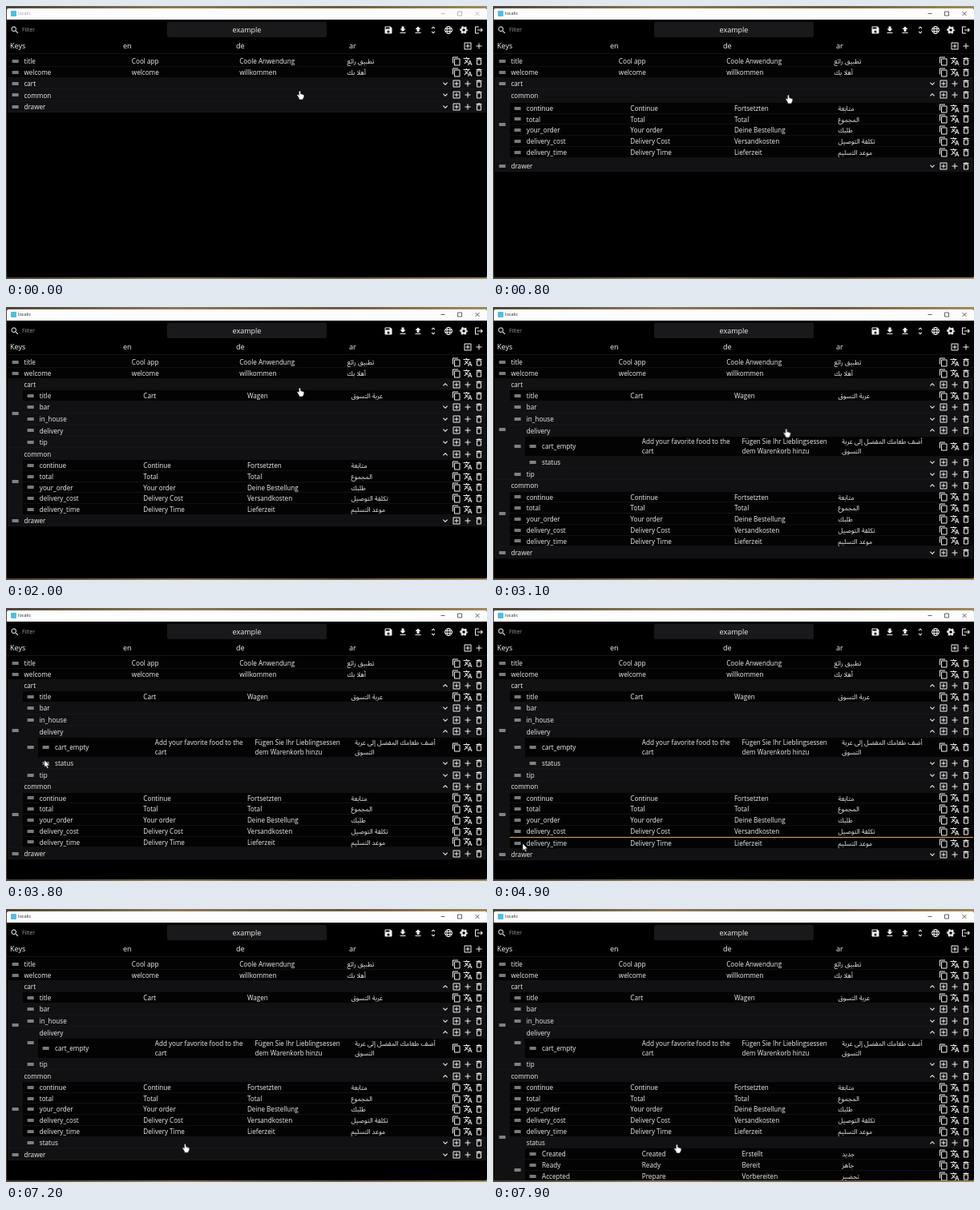
Recreate the animation shown at these times as an HTML page. Size 600x341 px, loop 8000 ms.

```html
<!DOCTYPE html>
<html lang="en">
<head>
<meta charset="utf-8">
<title>localic</title>
<style>
* { box-sizing: border-box; }
html, body { margin: 0; width: 100%; height: 100%; overflow: hidden; }
body {
  position: relative; color: #f2f2f2;
  background: linear-gradient(90deg, #4c4436, #8a7a58 35%, #6b5c3e 70%, #a08a5c);
  font: 8.15px/13.75px "Open Sans", "Noto Sans", "Noto Sans Arabic", "DejaVu Sans", sans-serif;
  white-space: pre;
}
svg { display: block; width: 12px; height: 12px; fill: currentColor; flex: none; }
#win { position: absolute; left: 1px; top: 3px; width: 598.5px; height: 336px; overflow: hidden; border-radius: 2px; background: #000; }
#bar { position: absolute; inset: 0 0 auto; height: 14px; background: #fdfdfd; font-size: 5.6px; line-height: 13px; color: #222; animation: focus 8s infinite; }
#bar i { position: absolute; left: 4.5px; top: 3px; width: 7px; height: 6.5px; background: #4fbfe0; border-radius: 1px; }
#bar span { position: absolute; left: 14px; }
#bar svg { position: absolute; left: 540px; top: 3px; width: 52px; height: 7px; fill: none; stroke: currentColor; stroke-width: .7; }
#tools svg, #find { position: absolute; top: 21px; }
#find { left: 4px; }
#filter { position: absolute; left: 19px; top: 20px; font-size: 6.9px; color: #999; }
#name { position: absolute; left: 200px; top: 17px; width: 199px; height: 19px; background: #19191b; border-radius: 2px; text-align: center; font-size: 9px; line-height: 20px; }
#head { position: absolute; left: 4px; top: 39px; width: 564px; display: flex; font-size: 9.1px; line-height: 16px; }
#head span { flex: 1; }
#win > .acts { top: 41px; }
#rule { position: absolute; left: 0; right: 0; top: 56px; height: 1px; background: #151516; }
#list { position: absolute; left: .8px; right: .5px; top: 59px; }
.acts { position: absolute; right: 2px; top: 0; height: 100%; display: flex; align-items: center; }
#win > .acts { right: 2.5px; height: 12px; }
.acts svg { margin: 0 1px; }
.item { display: flex; position: relative; overflow: hidden; }
.grip { width: 19.3px; flex: none; display: flex; align-items: center; justify-content: center; }
.body { flex: 1; min-width: 0; }
.row { position: relative; display: flex; align-items: center; height: 14.65px; padding: 0 39px 0 1.4px; }
.row span { flex: 1 1 0; min-width: 0; }
.leaf { background: #030303; box-shadow: inset 0 -.6px #202022; }
.leaf .row { height: 13.75px; }
.tall .row { height: 24.8px; line-height: 11.9px; }
.group { background: #111113; box-shadow: inset 0 -.6px #1d1d20; }
.kids { display: grid; grid-template-rows: 0fr; }
.kids > div { overflow: hidden; min-height: 0; }
.line { height: 0; background: #d3a457; }

/* expanding sections */
#common > .body > .kids { animation: open-common 8s infinite, gap 8s infinite; }
#cart > .body > .kids { animation: open-cart 8s infinite; }
#delivery > .body > .kids { animation: open-delivery 8s infinite; }
#moved > .body > .kids { animation: open-status 8s infinite; }
#common > .body > .row .chev { animation: flip-common 8s infinite; }
#cart > .body > .row .chev { animation: flip-cart 8s infinite; }
#delivery > .body > .row .chev { animation: flip-delivery 8s infinite; }
#moved > .body > .row .chev { animation: flip-status 8s infinite; }
@keyframes open-common { 0%, 3.1% { grid-template-rows: 0fr; } 7.5%, 100% { grid-template-rows: 1fr; } }
@keyframes open-cart { 0%, 18% { grid-template-rows: 0fr; } 22%, 100% { grid-template-rows: 1fr; } }
@keyframes open-delivery { 0%, 34% { grid-template-rows: 0fr; } 38%, 100% { grid-template-rows: 1fr; } }
@keyframes open-status { 0%, 93% { grid-template-rows: 0fr; } 97.5%, 100% { grid-template-rows: 1fr; } }
@keyframes flip-common { 0%, 3.1% { transform: none; } 7.5%, 100% { transform: scaleY(-1); } }
@keyframes flip-cart { 0%, 18% { transform: none; } 22%, 100% { transform: scaleY(-1); } }
@keyframes flip-delivery { 0%, 34% { transform: none; } 38%, 100% { transform: scaleY(-1); } }
@keyframes flip-status { 0%, 93% { transform: none; } 97.5%, 100% { transform: scaleY(-1); } }
@keyframes gap { 0%, 3.1% { padding: 0; } 7.5%, 10% { padding: 2px 0 3px; } 12.5%, 100% { padding: 0; } }

/* drag and drop */
#status { animation: leave-status 8s infinite; }
#moved { animation: enter-status 8s infinite; }
#time { animation: leave-time 8s infinite; }
#time .grip { animation: held 8s infinite; }
#raised { animation: enter-time 8s infinite; }
#drop1 { animation: drop1 8s infinite; }
#drop2 { animation: drop2 8s infinite; }
#drop3 { animation: drop3 8s infinite; }
@keyframes leave-status { 0%, 65% { max-height: 15px; } 65.01%, 100% { max-height: 0; } }
@keyframes enter-status { 0%, 65% { max-height: 0; } 65.01%, 100% { max-height: 200px; } }
@keyframes leave-time { 0%, 82.5% { max-height: 14px; } 82.51%, 100% { max-height: 0; } }
@keyframes enter-time { 0%, 82.5% { max-height: 0; } 82.51%, 100% { max-height: 14px; } }
@keyframes held { 0%, 71% { color: #f2f2f2; } 71.01%, 82.5% { color: #e09a2c; } 82.51%, 100% { color: #f2f2f2; } }
@keyframes drop1 { 0%, 58% { height: 0; } 58.01%, 60% { height: 1.4px; } 60.01%, 100% { height: 0; } }
@keyframes drop2 { 0%, 60% { height: 0; } 60.01%, 65% { height: 1.4px; } 65.01%, 100% { height: 0; } }
@keyframes drop3 { 0%, 75% { height: 0; } 75.01%, 82.5% { height: 1.4px; } 82.51%, 100% { height: 0; } }
@keyframes focus { 0%, 3% { color: #a0a0a0; } 3.01%, 100% { color: #222; } }

/* pointer */
#cursor { position: absolute; left: 0; top: 0; animation: travel 8s infinite ease-in-out; }
#cursor svg { position: absolute; overflow: visible; fill: #fff; stroke: #000; }
#hand { left: -5.4px; top: -1.1px; width: 13px; height: 13px; animation: hand 8s infinite; }
#arrow { left: 0; top: 0; stroke-width: .5; animation: arrow 8s infinite; }
@keyframes travel {
  0%, 3% { transform: translate(366px, 106px); }
  9%, 13% { transform: translate(368px, 111px); }
  17.5%, 26% { transform: translate(366px, 101px); }
  32%, 38.5% { transform: translate(366px, 152px); }
  46.5%, 50% { transform: translate(48px, 190px); }
  61%, 65% { transform: translate(37px, 294px); }
  70%, 72% { transform: translate(30px, 291px); }
  77.5%, 83% { transform: translate(29.5px, 272px); }
  91%, 100% { transform: translate(229px, 294px); }
}
@keyframes hand { 0%, 45% { opacity: 1; } 45.01%, 85% { opacity: 0; } 85.01%, 100% { opacity: 1; } }
@keyframes arrow { 0%, 45% { opacity: 0; } 45.01%, 85% { opacity: 1; } 85.01%, 100% { opacity: 0; } }
</style>
</head>
<body>
<div id="win">
  <div id="bar"><i></i><span>localic</span><svg viewBox="0 0 52 7"><path d="M1.5 3.5h5M22.5 1h5v5h-5zM44.5 1l5 5m0-5l-5 5"/></svg></div>
  <div id="filter">Filter</div>
  <div id="name">example</div>
  <div id="tools"></div>
  <div id="head"><span>Keys</span><span>en</span><span>de</span><span>ar</span></div>
  <div id="rule"></div>
  <div id="list"></div>
</div>
<div id="cursor">
  <svg id="hand" viewBox="0 0 24 24"><path d="M10 2a2 2 0 0 1 2 2v4.5s2-.25 2 .75c0 0 2-.25 2 .75 0 0 2-.25 2 .75 0 0 2-.25 2 .75V15c0 1-3 6-3 7H9s-2-7-5-9c0 0-1-6 4-1V4a2 2 0 0 1 2-2z"/></svg>
  <svg id="arrow" viewBox="0 0 12 12"><path d="M0 0v9l2-1.8 1.5 3.3 1.5-.7-1.5-3.1h2.8z"/></svg>
</div>
<script>
const shapes = {
  grip: 'M20 9H4v2h16zM4 15h16v-2H4z',
  copy: 'M16 1H4c-1.1 0-2 .9-2 2v14h2V3h12zm3 4H8c-1.1 0-2 .9-2 2v14c0 1.1.9 2 2 2h11c1.1 0 2-.9 2-2V7c0-1.1-.9-2-2-2zm0 16H8V7h11z',
  lang: 'M12.87 15.07l-2.54-2.51.03-.03c1.74-1.94 2.98-4.17 3.71-6.53H17V4h-7V2H8v2H1v2h11.17C11.5 7.92 10.44 9.75 9 11.35 8.07 10.32 7.3 9.19 6.69 8h-2c.73 1.63 1.73 3.17 2.98 4.56l-5.09 5.02L4 19l5-5 3.11 3.11zM18.5 10h-2L12 22h2l1.12-3h4.75L21 22h2zm-2.62 7l1.62-4.33L19.12 17z',
  trash: 'M6 19c0 1.1.9 2 2 2h8c1.1 0 2-.9 2-2V7H6zM8 9h8v10H8zm7.5-5l-1-1h-5l-1 1H5v2h14V4z',
  plus: 'M19 13h-6v6h-2v-6H5v-2h6V5h2v6h6z',
  box: 'M19 3H5c-1.11 0-2 .9-2 2v14c0 1.1.89 2 2 2h14c1.1 0 2-.9 2-2V5c0-1.1-.9-2-2-2zm0 16H5V5h14zm-8-2h2v-4h4v-2h-4V7h-2v4H7v2h4z',
  chev: 'M16.59 8.59L12 13.17 7.41 8.59 6 10l6 6 6-6z',
  find: 'M15.5 14h-.79l-.28-.27A6.5 6.5 0 1 0 13.73 14.43l.27.28v.79l5 5L20.5 19zm-6 0a4.5 4.5 0 1 1 0-9 4.5 4.5 0 0 1 0 9z',
  save: 'M17 3H5c-1.11 0-2 .9-2 2v14c0 1.1.89 2 2 2h14c1.1 0 2-.9 2-2V7zm-5 16a3 3 0 1 1 0-6 3 3 0 0 1 0 6zm3-10H5V5h10z',
  down: 'M5 20h14v-2H5zM19 9h-4V3H9v6H5l7 7z',
  up: 'M5 20h14v-2H5zM9 16h6v-6h4l-7-7-7 7h4z',
  unfold: 'M12 5.83L15.17 9l1.41-1.41L12 3 7.41 7.59 8.83 9zm0 12.34L8.83 15l-1.41 1.41L12 21l4.59-4.59L15.17 15z',
  exit: 'M17 7l-1.41 1.41L18.17 11H8v2h10.17l-2.58 2.58L17 17l5-5zM4 5h8V3H4c-1.1 0-2 .9-2 2v14c0 1.1.9 2 2 2h8v-2H4z'
};
const svg = (name, inner) => `<svg class="${name}" viewBox="0 0 24 24">${inner}</svg>`;
const icon = name => svg(name, `<path d="${shapes[name]}"/>`);
const acts = names => `<div class="acts">${names.split(' ').map(icon).join('')}</div>`;
const globe = svg('globe', '<g fill="none" stroke="currentColor" stroke-width="2"><circle cx="12" cy="12" r="9"/><ellipse cx="12" cy="12" rx="4" ry="9"/><path d="M4 9h16M4 15h16"/></g>');
const gear = svg('gear', '<g fill="none" stroke="currentColor"><circle cx="12" cy="12" r="5.5" stroke-width="4"/><circle cx="12" cy="12" r="8.4" stroke-width="3" stroke-dasharray="4.4 4.4" stroke-dashoffset="2.2"/></g>');

const item = (cls, id, body) =>
  `<div class="item ${cls}"${id ? ` id="${id}"` : ''}><div class="grip">${icon('grip')}</div><div class="body">${body}</div></div>`;
const row = (cells, names) =>
  `<div class="row">${cells.map(c => `<span>${c}</span>`).join('')}${acts(names)}</div>`;
const leaf = (cells, id, cls = '') => item('leaf ' + cls, id, row(cells, 'copy lang trash'));
const group = (key, id, kids = []) => item('group', id,
  row([key], 'chev box plus trash') + `<div class="kids"><div>${kids.join('')}</div></div>`);
const line = id => `<div class="line" id="${id}"></div>`;

const time = ['delivery_time', 'Delivery Time', 'Lieferzeit', 'موعد التسليم'];
const states = [
  ['Created', 'Created', 'Erstellt', 'جديد'],
  ['Ready', 'Ready', 'Bereit', 'جاهز'],
  ['Accepted', 'Prepare', 'Vorbereiten', 'تحضير'],
  ['Delivered', 'Delivered', 'Geliefert', 'تم'],
  ['Canceled', 'Canceled', 'Storniert', 'ملغي']
];

document.getElementById('list').innerHTML = [
  leaf(['title', 'Cool app', 'Coole Anwendung', 'تطبيق رائع']),
  leaf(['welcome', 'welcome', 'willkommen', 'أهلا بك']),
  group('cart', 'cart', [
    leaf(['title', 'Cart', 'Wagen', 'عربة التسوق']),
    group('bar'),
    group('in_house'),
    group('delivery', 'delivery', [
      leaf(['cart_empty', 'Add your favorite food to the\ncart', 'Fügen Sie Ihr Lieblingsessen\ndem Warenkorb hinzu', 'أضف طعامك المفضل إلى عربة\nالتسوق'], '', 'tall'),
      group('status', 'status')
    ]),
    group('tip')
  ]),
  group('common', 'common', [
    leaf(['continue', 'Continue', 'Fortsetzten', 'متابعة']),
    leaf(['total', 'Total', 'Total', 'المجموع']),
    leaf(['your_order', 'Your order', 'Deine Bestellung', 'طلبك']),
    line('drop1'),
    leaf(['delivery_cost', 'Delivery Cost', 'Versandkosten', 'تكلفة التوصيل']),
    leaf(time, 'raised'),
    line('drop3'),
    group('status', 'moved', states.map(s => leaf(s))),
    line('drop2'),
    leaf(time, 'time')
  ]),
  group('drawer', 'drawer')
].join('');

const tools = document.getElementById('tools');
tools.innerHTML = [icon('save'), icon('down'), icon('up'), icon('unfold'), globe, gear, icon('exit')].join('');
[...tools.children].forEach((el, i) => el.style.left = 469.5 + i * 18.9 + 'px');
tools.insertAdjacentHTML('beforeend', `<div id="find">${icon('find')}</div>`);
document.querySelector('#find svg').style.position = 'static';
document.getElementById('win').insertAdjacentHTML('beforeend', acts('box plus'));
</script>
</body>
</html>
```
